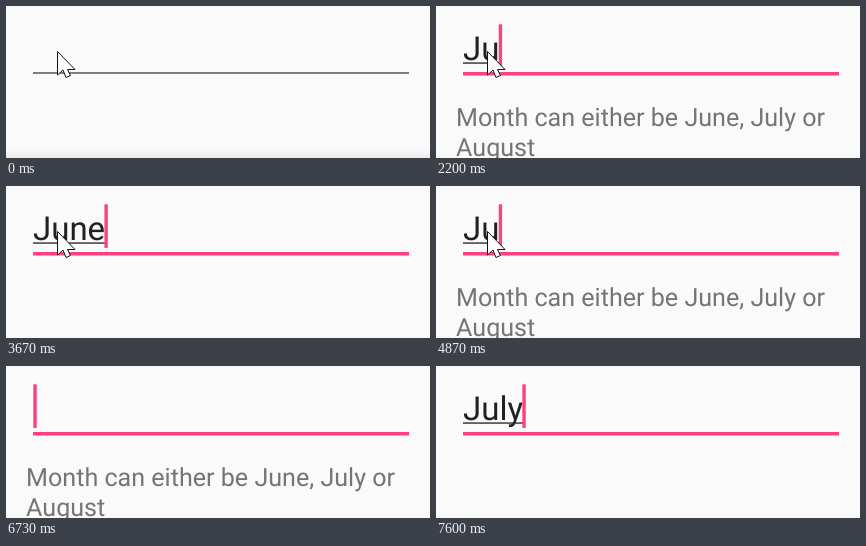
An HTML page that plays this animation: 424x152 px, repeating every 8000 ms.

```html
<!DOCTYPE html>
<html lang="en">
<head>
<meta charset="utf-8">
<title>Month field</title>
<style>
  html, body { margin: 0; width: 100%; height: 100%; overflow: hidden; background: #fafafa; }
  svg { display: block; width: 424px; height: 152px; font-family: Roboto, sans-serif; text-rendering: geometricPrecision; }
  #value { font-size: 33px; fill: #212121; }
  #error { font-size: 25.1px; fill: #757575; }
  .accent { fill: #ff4081; }
</style>
</head>
<body>
<svg viewBox="0 0 424 152">
  <defs>
    <linearGradient id="fade" x1="0" y1="0" x2="0" y2="1">
      <stop offset="0" stop-color="#fafafa"/>
      <stop offset="1" stop-color="#ececec"/>
    </linearGradient>
  </defs>
  <rect width="424" height="152" fill="#fafafa"/>
  <rect id="shade" y="143" width="424" height="9" fill="url(#fade)"/>
  <rect id="idle" x="27" y="66.3" width="376" height="1.4" fill="#4a4a4a"/>
  <rect id="active" class="accent" x="27" y="66" width="376" height="3.5"/>
  <text id="value" x="27" y="53.7"></text>
  <rect id="under" x="27" y="56.4" height="1.3" fill="#212121"/>
  <rect id="caret" class="accent" y="18.3" width="3.4" height="43.6"/>
  <g id="error">
    <text x="20.1" y="120">Month can either be June, July or</text>
    <text x="20.1" y="149.6">August</text>
  </g>
  <path id="pointer" d="M.5 .5V24L6 19L9 26.5L13.5 24.5L10.5 18.5H18Z" fill="#fff" stroke="#111"/>
</svg>
<script>
const LOOP = 8000;
const $ = id => document.getElementById(id);
const show = (id, on) => $(id).setAttribute('visibility', on ? 'visible' : 'hidden');

// [time, value]
const typing = [
  [0, ''], [1800, 'J'], [2070, 'Ju'], [2330, 'Jun'], [2670, 'June'],
  [4130, 'Jun'], [4870, 'Ju'], [5130, 'J'], [5800, ''],
  [6800, 'J'], [7000, 'Ju'], [7270, 'Jul'], [7470, 'July']
];
const blinks = [[0, 400], [930, 1330], [3200, 3670], [4730, 4870], [5670, 5800], [6270, 6730]];
const errorAlpha = [
  [0, 0], [1800, .35], [1870, .75], [1930, 1], [2670, .4], [2730, 0],
  [4130, 1], [7470, .4], [7600, 0]
];

const at = (steps, t) => steps.findLast(s => s[0] <= t)[1];

function pointerPos(t) {
  const p = Math.min(1, Math.max(0, (t - 4940) / 460));
  const e = p * p * (3 - 2 * p);
  return [51 + 194 * e, 45 - 42 * e];
}

function draw(t) {
  const focused = t >= 400;
  const text = at(typing, t);
  if ($('value').textContent !== text) $('value').textContent = text;
  const width = text ? $('value').getComputedTextLength() : 0;

  show('shade', !focused);
  show('idle', !focused);
  show('active', focused);
  show('caret', !blinks.some(([a, b]) => t >= a && t < b));
  $('caret').setAttribute('x', 27.3 + Math.max(0, width - 1));
  $('under').setAttribute('width', width);
  $('error').setAttribute('opacity', at(errorAlpha, t));

  $('pointer').setAttribute('transform', `translate(${pointerPos(t).map(Math.round)})`);
  show('pointer', t < 5470);
}

const start = performance.now();
function tick() {
  draw((performance.now() - start) % LOOP);
  requestAnimationFrame(tick);
}
tick();
</script>
</body>
</html>
```
